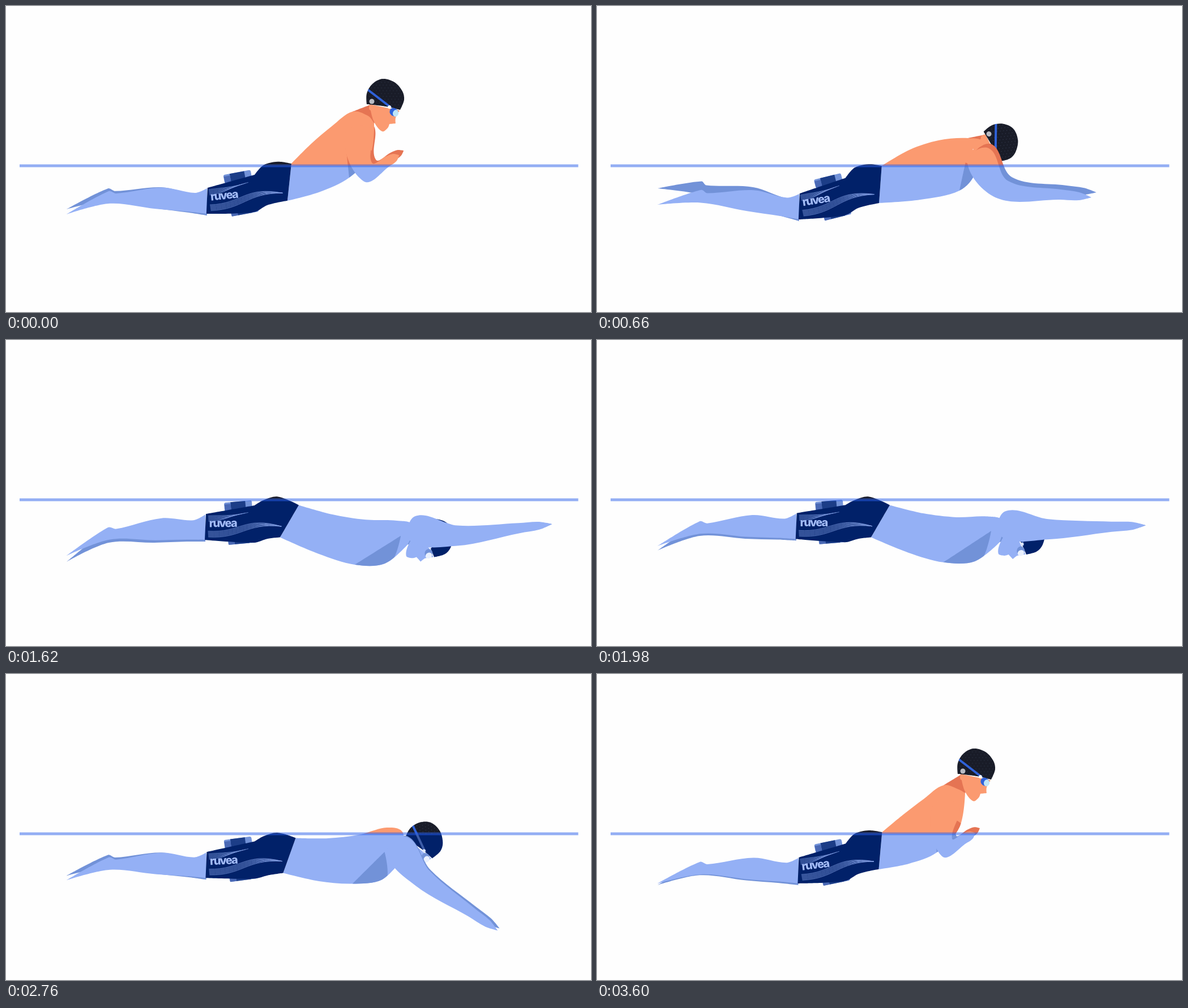
An HTML page with a canvas that plays this animation: 1033 by 542 pixels, repeating every 3720 ms.

```html
<!DOCTYPE html>
<html lang="en">
<head>
<meta charset="utf-8">
<title>Breaststroke</title>
<style>
html, body { margin: 0; width: 100%; height: 100%; overflow: hidden; background: #fefefe; }
canvas { display: block; width: 100vw; height: 100vh; }
</style>
</head>
<body>
<canvas id="stage"></canvas>
<script>
const W = 1033, H = 542, LOOP = 3720, STEP = 60, WATER = 283;
const canvas = document.getElementById('stage');
const ctx = canvas.getContext('2d');
const ratio = window.devicePixelRatio || 1;
canvas.width = W * ratio;
canvas.height = H * ratio;

const AIR = {
  skin: '#fb9a70', shade: '#e57453', suit: '#1b1d2a', cap: '#191c28', strap: '#2f62d9',
  rim: '#2f62d9', lens: '#bfe6f8', nub: '#ffffff', badge: '#b9bcc4', dot: '#3b4258'
};
const SEA = {
  skin: '#94b0f5', shade: '#7292d8', suit: '#012169', cap: '#012169', strap: '#3d5da8',
  rim: '#7292d8', lens: '#e9f0fe', nub: '#dfe8fd'
};

// head: goggles x, y, tilt; back: shoulder x, y, arch; belly: lowest point of the chest;
// arm: upper angle, forearm angle, reach; waist: y, tilt; leg: cuff, ankle, toe, gap to far toe.
const poses = [
  { t: 0, pace: 1.5, head: [686, 188, 0], back: [612, 187, 4], belly: [606, 304],
    arm: [76, -28, 63], waist: [312, 6], leg: [345, 341, 369, -9] },
  { t: 660, pace: 1, head: [701, 270, 53], back: [655, 234, 12], belly: [640, 327],
    arm: [56, 5, 157], waist: [316, 4], leg: [355, 340, 352, -29] },
  { t: 1200, pace: 1, head: [745, 377, 53], back: [690, 317, -6], belly: [633, 399],
    arm: [19, -5, 171], waist: [324, 17], leg: [358, 365, 395, -13] },
  { t: 1620, pace: 1, head: [747, 379, 53], back: [690, 320, -7], belly: [616, 398],
    arm: [14, -7, 169], waist: [321, 30], leg: [331, 344, 382, 11] },
  { t: 2340, pace: 1.15, head: [750, 363, 51], back: [685, 297, -8], belly: [610, 386],
    arm: [11, 8, 177], waist: [321, 30], leg: [329, 329, 354, 2] },
  { t: 3120, pace: 0.75, head: [724, 266, 2], back: [650, 239, -5], belly: [614, 350],
    arm: [101, 57, 128], waist: [322, 7], leg: [348, 347, 377, -15] },
  { t: 3600, pace: 1, head: [686, 191, 0], back: [612, 197, 2], belly: [600, 316],
    arm: [87, -27, 56], waist: [313, 5], leg: [348, 346, 371, 3] }
];

// Cyclic interpolation that never overshoots a pose.
function sample(t) {
  const n = poses.length;
  let i = n - 1;
  while (poses[i].t > t) i--;
  const near = [-1, 0, 1, 2].map(d => poses[(i + d + n) % n]);
  const time = [-1, 0, 1, 2].map(d => poses[(i + d + n) % n].t + LOOP * Math.floor((i + d) / n));
  const span = time[2] - time[1];
  const u = Math.pow((t - time[1]) / span, near[1].pace);
  const slope = (p, q) => p * q > 0 ? 2 * p * q / (p + q) : 0;
  const out = {};
  for (const name of ['head', 'back', 'belly', 'arm', 'waist', 'leg']) {
    out[name] = near[1][name].map((b, j) => {
      const [a, , c, d] = near.map(k => k[name][j]);
      const s0 = (b - a) / (time[1] - time[0]);
      const s1 = (c - b) / span;
      const s2 = (d - c) / (time[3] - time[2]);
      return b + (c - b) * u * u * (3 - 2 * u) +
        span * u * (1 - u) * (slope(s0, s1) * (1 - u) - slope(s1, s2) * u);
    });
  }
  return out;
}

const rad = deg => deg * Math.PI / 180;
const add = ([x, y], dx, dy) => [x + dx, y + dy];
const mix = (a, b, f) => [a[0] + (b[0] - a[0]) * f, a[1] + (b[1] - a[1]) * f];
const polar = ([x, y], deg, r) => [x + Math.cos(rad(deg)) * r, y + Math.sin(rad(deg)) * r];
function unit(a, b) {
  const len = Math.hypot(b[0] - a[0], b[1] - a[1]) || 1;
  return [(b[0] - a[0]) / len, (b[1] - a[1]) / len];
}

// A closed curve through the points; those listed as sharp stay corners.
function outline(pts, sharp = []) {
  const n = pts.length, pt = i => pts[(i + n) % n];
  const dir = i => sharp.includes((i + n) % n) ? [0, 0] : unit(pt(i - 1), pt(i + 1));
  const path = new Path2D();
  path.moveTo(...pt(0));
  for (let i = 0; i < n; i++) {
    const [x, y] = pt(i), [X, Y] = pt(i + 1), p = dir(i), q = dir(i + 1);
    const h = Math.hypot(X - x, Y - y) * 0.32;
    path.bezierCurveTo(x + p[0] * h, y + p[1] * h, X - q[0] * h, Y - q[1] * h, X, Y);
  }
  path.closePath();
  return path;
}

// A tapered limb along its joints, ending in a point.
function limb(joints, widths) {
  const one = [], two = [], last = joints.length - 1;
  for (let i = 0; i < last; i++) {
    const a = unit(joints[Math.max(i - 1, 0)], joints[Math.max(i, 1)]);
    const b = unit(joints[i], joints[i + 1]);
    const [x, y] = unit([0, 0], [a[0] + b[0], a[1] + b[1]]);
    one.push(add(joints[i], y * widths[i], -x * widths[i]));
    two.unshift(add(joints[i], -y * widths[i], x * widths[i]));
  }
  return outline([...one, joints[last], ...two], [last]);
}

function fill(path, color) {
  ctx.fillStyle = color;
  ctx.fill(path);
}

function oval(x, y, rx, ry, color, turn = 0) {
  ctx.beginPath();
  ctx.ellipse(x, y, rx, ry, turn, 0, Math.PI * 2);
  ctx.fillStyle = color;
  ctx.fill();
}

function line(color, width, draw) {
  ctx.beginPath();
  draw();
  ctx.strokeStyle = color;
  ctx.lineWidth = width;
  ctx.stroke();
}

const face = outline([[-44, -14], [-37, 15], [-22, 34], [-12, 28], [-9, 21], [2, 20], [2, 10], [9, -3]],
  [0, 4, 5, 7]);
const cap = outline([[-49, -14], [-49, -33], [-39, -50], [-21, -59], [0, -53], [14, -37], [17, -22], [10, -4], [-15, -10]],
  [0, 7]);

function drawHead([x, y, tilt], c) {
  ctx.save();
  ctx.translate(x, y);
  ctx.rotate(rad(tilt));
  fill(face, c.skin);
  oval(-42, -8, 3, 5, c.skin);
  fill(cap, c.cap);
  ctx.save();
  ctx.clip(cap);
  if (c.dot) {
    for (let r = 0; r < 11; r++)
      for (let k = 0; k < 13; k++)
        oval(-50 + k * 6 + r % 2 * 3, -58 + r * 5, 0.6, 0.6, c.dot);
  }
  line(c.strap, 4, () => { ctx.moveTo(-50, -42); ctx.lineTo(-6, -8); });
  ctx.restore();
  if (c.badge) oval(-40, -19, 4.5, 4.5, c.badge);
  oval(-1, 0, 8, 7, c.rim, 0.7);
  oval(2, 2, 5, 6, c.lens, 0.2);
  oval(-9, -9, 2.8, 3, c.nub);
  ctx.restore();
}

function legShape(cuff, ankle, toe) {
  const [dx, dy] = unit(ankle, toe);
  const along = (f, off) => add(mix(cuff, ankle, f), 0, off);
  const heel = add(ankle, dy * -15 + dx * 4, dx * 15 + dy * 4);
  return outline([
    along(0, -22), along(0.13, -13.5), along(0.48, -21.5), along(0.97, -9), heel, toe,
    along(1.04, 9), along(0.55, 16.5), along(0.2, 20), along(0, 23)
  ], [0, 5, 9]);
}

function armShape(shoulder, [up, fore, reach], shift, size) {
  const elbow = polar(shoulder, up, 110);
  const [dx, dy] = unit(shoulder, elbow);
  const root = add(shoulder, dx * 28 + 2, dy * 28 + 8);
  const joints = [root, elbow, ...[0.65, 0.86, 1].map(f => polar(elbow, fore, reach * f))];
  return limb(joints.map(j => add(j, shift, -shift)), [23, 18, 9, 7].map(w => w * size));
}

// All outlines of the body, worked out from one pose.
function build(p) {
  const [waistY, tilt] = p.waist, [cuffY, ankleY, toeY, gap] = p.leg;
  const shoulder = p.back.slice(0, 2), arch = p.back[2];
  const top = polar([500.5, waistY], tilt - 90, 33);
  const bottom = polar([500.5, waistY], tilt + 90, 33);
  const a = rad(p.head[2]), cos = Math.cos(a), sin = Math.sin(a);
  const onHead = (x, y) => add(p.head, x * cos - y * sin, x * sin + y * cos);

  const throat = onHead(-36, 20);
  const [nx, ny] = unit(throat, p.belly);
  const chest = push => add(mix(throat, p.belly, 0.5), ny * push, -nx * push);
  const [sx, sy] = unit(top, shoulder);
  const spine = f => add(mix(top, shoulder, f), sy * arch, -sx * arch);
  const torso = outline([
    top, spine(0.35), spine(0.69), shoulder, add(shoulder, 28, 8), throat, chest(17), p.belly,
    add(mix(p.belly, bottom, 0.5), 2, 5), bottom
  ], [0, 5, 9]);
  const root = add(polar(shoulder, p.arm[0], 28), 2, 8);

  const cuff = [355.5 + (cuffY - 348) * 0.2, cuffY];
  const ankle = [190, ankleY], toe = [107, toeY];
  const dip = 299 + (cuffY - 345) / 2 + (waistY - 312) / 10;
  const seat = waistY - 36 - (tilt - 5) * 0.3;
  const crotch = waistY + 41 - (tilt - 5) * 0.4;
  const hem = [[cuff[0] + 1, cuffY - 23], [439, dip], [438, dip + 66], [cuff[0] - 1, cuffY + 23]];

  return {
    torso,
    neck: outline([shoulder, onHead(-43, -13), onHead(-35, 18), throat], [0, 1, 2, 3]),
    ribs: outline([add(root, -22, 12), chest(26), p.belly], [0, 2]),
    arm: armShape(shoulder, p.arm, 0, 1),
    farArm: armShape(shoulder, p.arm, Math.max(0, 10 - tilt / 3), 0.85),
    leg: legShape(cuff, ankle, toe),
    farLeg: legShape(add(cuff, 0, 3), add(ankle, -2, gap / 2), add(toe, 0, gap)),
    shorts: outline([hem[0], hem[1], [455, seat + 6], [480, seat], top, bottom, [462, crotch], hem[2], hem[3]],
      [0, 1, 4, 5, 8]),
    cuff,
    thigh: unit(cuff, mix(hem[1], hem[2], 0.5))
  };
}

// Runs a drawing in the frame of the thigh, with its origin in the middle of the cuff.
function onThigh(b, draw) {
  ctx.save();
  ctx.translate(...b.cuff);
  ctx.rotate(Math.atan2(b.thigh[1], b.thigh[0]));
  draw();
  ctx.restore();
}

function float(x, y, h) {
  ctx.save();
  ctx.translate(x, y);
  ctx.rotate(-0.03);
  ctx.beginPath();
  ctx.roundRect(-24.5, -h / 2, 49, h, 3);
  ctx.fillStyle = '#7292d8';
  ctx.fill();
  ctx.fillStyle = '#1c3d87';
  ctx.fillRect(-13, -h / 2, 26, h);
  ctx.fillStyle = '#4a69b5';
  ctx.fillRect(-24, -h / 2 + 3, 11, h - 3);
  ctx.restore();
}

function trim() {
  const ink = '#7f9be0';
  for (let i = 0; i < 6; i++) {
    line(ink, 0.7, () => {
      ctx.moveTo(6, -19 + i * 1.9);
      ctx.bezierCurveTo(28, -19 + i * 1.9, 48 - i * 3, -16 + i, 77 - i * 5, -21 + i * 0.6);
    });
    line(ink, 0.8, () => {
      ctx.moveTo(4, 8 + i * 2);
      ctx.bezierCurveTo(62, 15 + i * 2, 70, -16 + i * 2.6, 134, 7);
    });
  }
  ctx.save();
  ctx.translate(31, -4);
  ctx.rotate(0.05);
  ctx.font = '800 20px Inter, "Open Sans", sans-serif';
  ctx.letterSpacing = '-1.8px';
  ctx.textAlign = 'center';
  ctx.fillStyle = '#a3bbf6';
  ctx.fillText('ruvea', 0, 6);
  ctx.restore();
}

function swimmer(p, b, c) {
  fill(b.farLeg, c.shade);
  fill(b.leg, c.skin);
  fill(b.neck, c.shade);
  drawHead(p.head, c);
  fill(b.farArm, c.shade);
  fill(b.torso, c.skin);
  ctx.save();
  ctx.clip(b.torso);
  fill(b.ribs, c.shade);
  ctx.restore();
  fill(b.arm, c.skin);
  onThigh(b, () => { float(60, -34, 15); float(63, 28, 11); });
  fill(b.shorts, c.suit);
  ctx.save();
  ctx.clip(b.shorts);
  onThigh(b, trim);
  ctx.restore();
}

function band(top, bottom, draw) {
  ctx.save();
  ctx.beginPath();
  ctx.rect(0, top, W, bottom - top);
  ctx.clip();
  draw();
  ctx.restore();
}

function frame(now) {
  const t = Math.min(Math.floor(now % LOOP / STEP) * STEP, 3600);
  const p = sample(t), b = build(p);
  ctx.setTransform(ratio, 0, 0, ratio, 0, 0);
  ctx.fillStyle = '#fefefe';
  ctx.fillRect(0, 0, W, H);
  band(0, WATER, () => swimmer(p, b, AIR));
  band(WATER, H, () => swimmer(p, b, SEA));
  ctx.fillStyle = 'rgba(42, 97, 235, 0.5)';
  ctx.fillRect(24, 280.5, 986.5, 5);
}

const start = performance.now();
function tick() {
  frame(performance.now() - start);
  requestAnimationFrame(tick);
}
tick();
</script>
</body>
</html>
```
